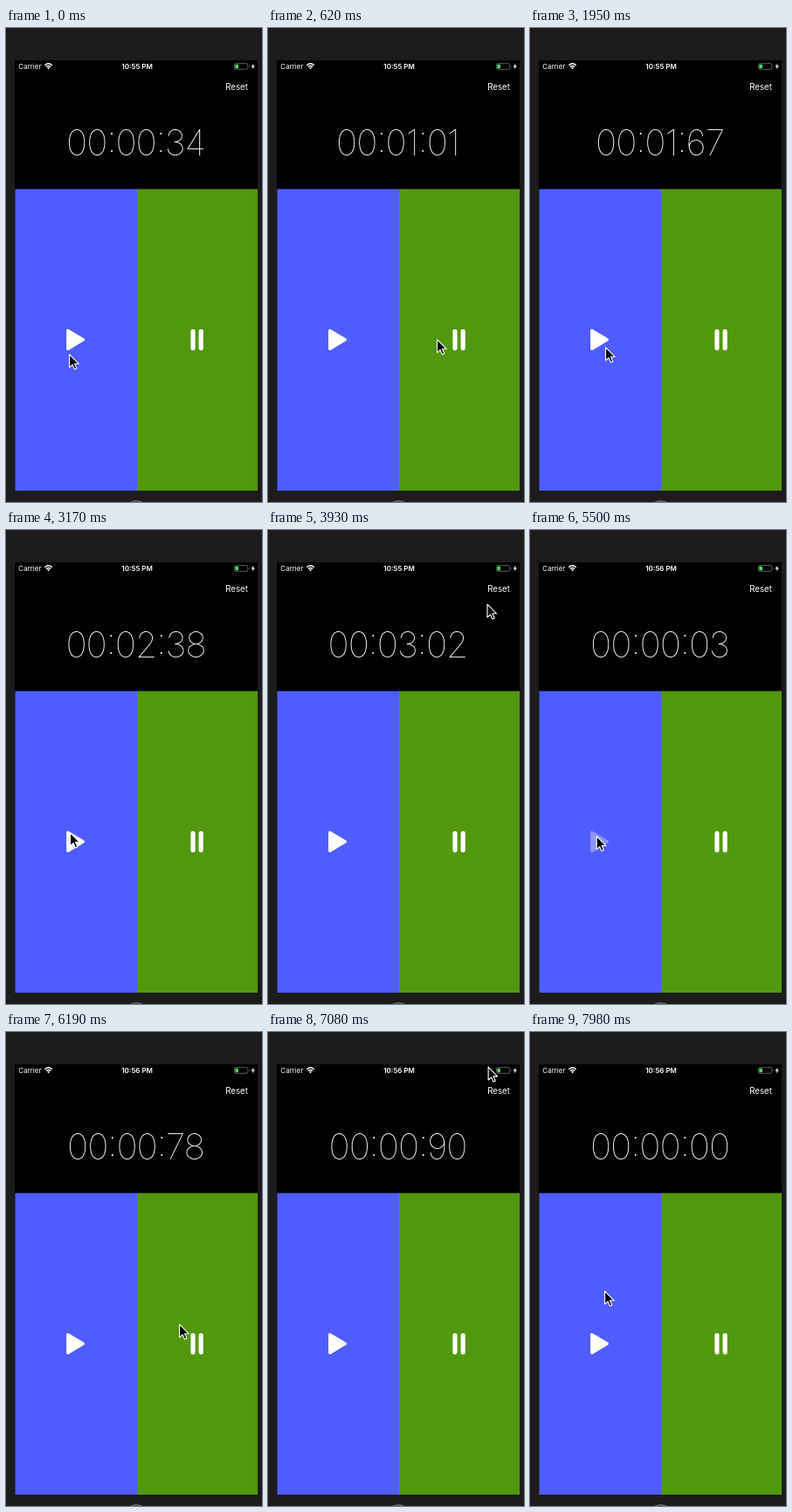
Recreate the animation shown at these times as an HTML page. Size 293 by 543 pixels, loop 8000 ms.

```html
<!DOCTYPE html>
<html lang="en">
<head>
<meta charset="utf-8">
<title>Stopwatch</title>
<style>
  html, body { margin: 0; width: 100%; height: 100%; overflow: hidden; background: #1c1c1c; }
  svg { display: block; width: 293px; height: 543px; }
  text { font-family: Inter, Roboto, sans-serif; fill: #fff; }
  .status { font-size: 8px; }
  #clock { font-weight: 600; text-anchor: middle; }
  #timer {
    font-size: 41px; font-weight: 100; letter-spacing: -1.05px;
    font-feature-settings: "case"; text-anchor: middle;
  }
  #reset { font-size: 9.7px; text-anchor: middle; }
</style>
</head>
<body>
<svg viewBox="0 0 293 543">
  <rect width="293" height="543" fill="#1c1c1c"/>
  <circle cx="149.5" cy="556" r="14.5" fill="#454543" stroke="#777773"/>
  <rect x="10" y="37" width="278" height="148" fill="#000"/>
  <rect x="10.6" y="184.5" width="139.4" height="345.5" fill="#505cff"/>
  <rect x="150" y="184.5" width="138" height="345.5" fill="#52980e"/>

  <text class="status" x="14.3" y="46.9">Carrier</text>
  <g fill="none" stroke="#fff" stroke-width="1.4">
    <path d="M44.4 42.8Q48.6 38.8 52.8 42.8"/>
    <path d="M46 44.6Q48.6 42.2 51.2 44.6"/>
  </g>
  <path d="M47.1 45.7Q48.6 44.5 50.1 45.7L48.6 47.3Z" fill="#fff"/>
  <text class="status" id="clock" x="150.1" y="46.9"></text>
  <rect x="261.4" y="40.7" width="15.4" height="6.6" rx="1.6" fill="none" stroke="#777" stroke-width=".8"/>
  <path d="M278 42.8Q279.2 44 278 45.2Z" fill="#777"/>
  <rect x="262.4" y="41.7" width="3.6" height="4.6" rx=".6" fill="#4cd964"/>
  <path d="M283.6 40.4L280.6 44.4H282.6L281.8 47.6L285 43.4H283Z" fill="#fff"/>

  <text id="reset" x="264.1" y="71.3">Reset</text>
  <text id="timer" x="148.5" y="146"></text>

  <path id="play" d="M70.9 346.7V367.4L88.2 357Z" fill="#fff" stroke="#fff" stroke-width="3.6" stroke-linejoin="round"/>
  <g id="pause" fill="#fff">
    <rect x="211.4" y="345" width="5.2" height="24.4" rx="2.4"/>
    <rect x="220.6" y="345" width="5.2" height="24.4" rx="2.4"/>
  </g>
  <path id="cursor" d="M.6 .9V15.9L4.1 12.7L6.4 17.9L8.8 16.9L6.5 11.7H11.2Z" fill="#000" stroke="#fff" stroke-width="1.1" stroke-linejoin="round"/>
</svg>
<script>
const LOOP = 8000;
const RATE = 0.108;           // hundredths counted per ms
const HOLD = 100, FADE = 200; // press before a tap, fade after it
const PRESSED = 0.2;
const TRAVEL = 0.6;           // share of each visit spent moving
const START = { x: 72, y: 373, count: 34.3 };

// The pointer leaves for (x, y), rests there and taps the button.
const visits = [
  { on: "pause", x: 193, y: 356, leave: 50, tap: 970 },
  { on: "play", x: 86, y: 365, leave: 970, tap: 1687 },
  { on: "pause", x: 198, y: 350, leave: 1960, tap: 2608 },
  { on: "play", x: 73, y: 346, leave: 2920, tap: 3340 },
  { on: "reset", x: 260, y: 70, leave: 3320, tap: 4500 },
  { on: "play", x: 75, y: 350, leave: 4640, tap: 5465 },
  { on: "pause", x: 198, y: 334, leave: 5480, tap: 6300 },
  { x: 248, y: 28, leave: 6540, tap: 7200 },
  { on: "reset", x: 260, y: 66, leave: 6980, tap: 7450 },
  { on: "play", x: 85, y: 296, leave: 7460, tap: 8300 }
];

const $ = id => document.getElementById(id);
const clamp = v => Math.min(1, Math.max(0, v));
const smooth = p => p * p * (3 - 2 * p);
const two = n => String(n).padStart(2, "0");

function pointerAt(t) {
  let { x, y } = START;
  for (const v of visits) {
    const p = smooth(clamp((t - v.leave) / (v.tap - v.leave) / TRAVEL));
    x += (v.x - x) * p;
    y += (v.y - y) * p;
  }
  return `translate(${x.toFixed(2)} ${y.toFixed(2)})`;
}

function countAt(t) {
  let count = START.count, since = 0, running = true;
  for (const { on, tap } of visits) {
    if (!on || tap > t) continue;
    if (running) count += (tap - since) * RATE;
    if (on === "reset") count = 0;
    running = on === "play";
    since = tap;
  }
  return Math.floor(running ? count + (t - since) * RATE : count);
}

function format(n) {
  const s = Math.floor(n / 100);
  return [Math.floor(s / 60), s % 60, n % 100].map(two).join(":");
}

function opacityAt(id, t) {
  const last = visits.filter(v => v.on === id && v.tap - HOLD <= t).pop();
  return last ? PRESSED + (1 - PRESSED) * clamp((t - last.tap) / FADE) : 1;
}

function draw(t) {
  $("cursor").setAttribute("transform", pointerAt(t));
  $("timer").textContent = format(countAt(t));
  $("clock").textContent = t < 5000 ? "10:55 PM" : "10:56 PM";
  for (const id of ["play", "pause", "reset"]) $(id).style.opacity = opacityAt(id, t);
}

const start = performance.now();
function tick() {
  draw((performance.now() - start) % LOOP);
  requestAnimationFrame(tick);
}
tick();
</script>
</body>
</html>
```
